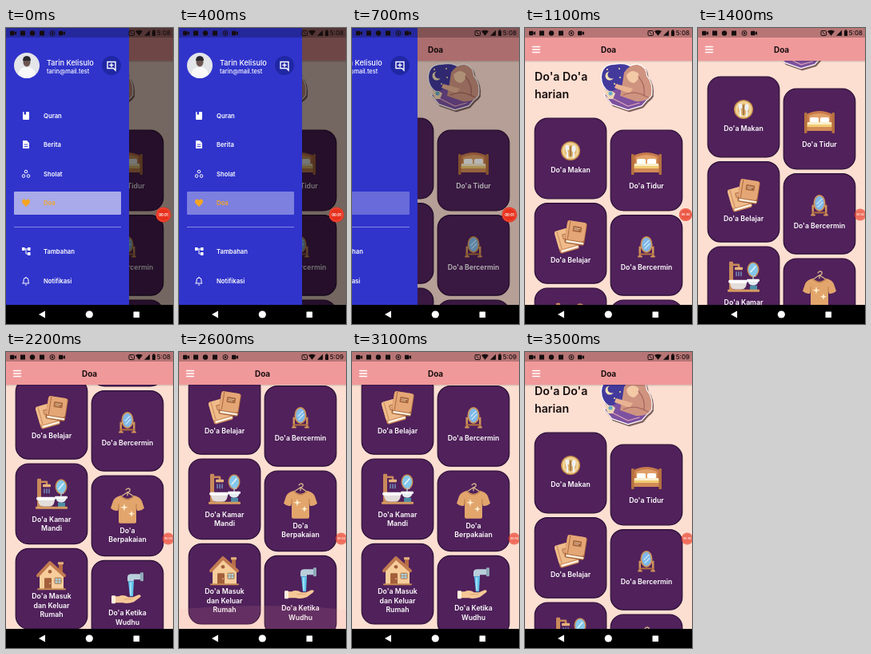
Write an HTML page that moves like this. It is 209 px wide and 371 px high and loops after 3.6 s.

```html
<!DOCTYPE html>
<html lang="id">
<head>
<meta charset="utf-8">
<title>Doa</title>
<style>
html, body { margin: 0; width: 100%; height: 100%; overflow: hidden; background: #000; }
svg { display: block; width: 209px; height: 371px; font-family: Inter, "Open Sans", sans-serif; }
</style>
</head>
<body>
<svg id="stage" viewBox="0 0 209 371"></svg>
<script>
const rect = (x, y, w, h, fill, r = 0, more = '') =>
  `<rect x="${x}" y="${y}" width="${w}" height="${h}" fill="${fill}" rx="${r}" ${more}/>`;
const disc = (x, y, r, fill, more = '') => `<circle cx="${x}" cy="${y}" r="${r}" fill="${fill}" ${more}/>`;
const oval = (x, y, rx, ry, fill, more = '') =>
  `<ellipse cx="${x}" cy="${y}" rx="${rx}" ry="${ry}" fill="${fill}" ${more}/>`;
const path = (d, fill, more = '') => `<path d="${d}" fill="${fill}" ${more}/>`;
const line = (d, color, w = 1) =>
  path(d, 'none', `stroke="${color}" stroke-width="${w}" stroke-linecap="round" stroke-linejoin="round"`);
const text = (s, x, y, size, fill, weight = 600, more = '') =>
  `<text x="${x}" y="${y}" font-size="${size}" fill="${fill}" font-weight="${weight}" ${more}>${s}</text>`;
const group = (inner, move = '', id = '') => `<g id="${id}" transform="${move}">${inner}</g>`;
const at = (x, y, inner) => `<g transform="translate(${x} ${y})">${inner}</g>`;

const middle = 'text-anchor="middle"';
const brown = '#b5703f', cream = '#f8e3c0', sky = '#84c8ec', pink = '#f0999a', ink = '#160d0e';

const book = (cover, edge) =>
  rect(-12, -15, 25, 29, edge, 3) + rect(-12, -15, 24, 24, cover, 3) +
  rect(-10, 10, 22, 2.5, '#fff3e2') + rect(-4, -9, 11, 7, edge, 1) +
  line('M-2 -6.5H5M-2 -4.5H3', cream, .7) + line('M-8.5 -14V8', edge, .9);

const icons = {
  plate: disc(0, 0, 12, '#c9924f') + disc(0, 0, 10.5, '#f0d293') + disc(0, 0, 7, '#d9a65e') +
    line('M-5 -6V-2Q-5 1 -4 2V8M-3 -6V-2M4 2V8', '#eef0f2', 2.4) + oval(4, -2.5, 2.6, 4.5, '#eef0f2') +
    line('M0 -5V7', '#6e5436', 1),
  books: group(book('#efbb8a', '#c98659'), 'translate(-5 4) rotate(-16)') +
    group(book('#e5a676', '#a8683f'), 'translate(6 -5) rotate(9)'),
  bath: rect(-18, -19, 5, 36, '#c98a5a', 1) + line('M-13 -15H-6V-11', '#c98a5a', 2.5) +
    rect(-11, -12, 10, 3.5, '#e6b27c', 1) + line('M-9 -6V-1M-6 -6V-1M-3 -6V-1', sky, 1) +
    oval(12, -9, 7.5, 9.5, '#c98a4e') + oval(12, -9, 6, 8, sky) + line('M9 -6L15 -13', '#e6f6fd', 1.5) +
    path('M-17 6H4Q4 16 -3 16H-10Q-17 16 -17 6Z', '#e3dedb') + rect(-19, 4, 24, 4, '#fff', 2) +
    path('M5 4H19Q18 11 12 11Q6 11 5 4Z', '#e4ecf0') + rect(4, 3, 16, 3, '#fff', 1) +
    rect(8, 11, 9, 6, '#4d8fa8') + line('M12 3V-1H15', '#b8c3cc', 1.5) + rect(-20, 16, 40, 3, '#d59a60', 1),
  house: rect(9, -15, 5, 13, '#b56b45') + rect(8, -16, 7, 3, '#e6b27c', .5) +
    path('M-15 1L-2 -13L15 1V18H-15Z', '#f6cd9b') + line('M-17 1L-2 -15L16 1', '#c27a50', 4) +
    rect(-9, 4, 9, 14, '#a35f3a', 1) + disc(-2, 11, .8, cream) + disc(-2, -4, 2.3, '#a35f3a') +
    rect(4, 4, 8, 7, '#a5d6e8', .5, `stroke="${brown}"`) + line('M8 4V11M4 7.5H12', brown, .7) +
    rect(-18, 17, 36, 2, '#c68a56', 1),
  bed: path('M-16 10V-10Q0 -18 16 -10V10Z', '#c87b4c') + path('M-13 0V-8Q0 -14 13 -8V0Z', '#e0a068') +
    rect(-12, -6, 11, 7, '#fff', 2) + rect(1, -6, 11, 7, '#fff', 2) +
    path('M-15 0H15L17 8H-17Z', '#fbeecb') + rect(-16, 3, 32, 3, '#f2cb74') + rect(-17, 6, 34, 5, '#d18a56', 1) +
    rect(-19, -12, 3.5, 26, brown, 1) + rect(15.5, -12, 3.5, 26, brown, 1),
  mirror: rect(-9.5, -1, 2.5, 13, '#d0945a', 1) + rect(7, -1, 2.5, 13, '#d0945a', 1) +
    oval(0, -3, 7.5, 10.5, '#d0945a') + oval(0, -3, 5.7, 8.6, '#7fb8ea') +
    line('M-3 -2L3 -8M-2 2L4 -4', '#d3ecfa', 1.2) + rect(-9, 8, 18, 2, brown) + line('M-10 12H-6M6 12H10', '#d0945a', 2),
  shirt: line('M0 -13V-17Q4 -18 3 -21Q0 -23 -2 -20M0 -17L-9 -11M0 -17L9 -11', '#d8b98c', 1.3) +
    path('M-8 -13Q-16 -11 -18 -6L-21 3Q-17 7 -12 6L-11 3V20Q-11 22 -9 22H9Q11 22 11 20V3L12 6Q17 7 21 3L18 -6Q16 -11 8 -13Q0 -5 -8 -13Z', '#e2a56c') +
    line('M-11 4V-2M11 4V-2M-8 -12Q0 -4 8 -12', '#bd7e49', 1.1) +
    path('M-4 -3L-3 1L1 2L-3 3L-4 7L-5 3L-9 2L-5 1ZM5 6L6 9L9 10L6 11L5 14L4 11L1 10L4 9Z', '#fff0d2'),
  tap: path('M0 -9V-14Q0 -18 5 -18H19V-11H8V-9Z', '#b9cfdb') + rect(16, -20, 4, 11, '#8fa9b8', 1) +
    path('M1 -9H8L7 10H3Z', '#5fc3ec') + line('M4 -7V8', '#c9effb', 1.2) +
    path('M-17 10H-11Q-5 7 1 11H7L14 8Q18 8 16 11L8 17Q0 20 -6 18H-17Z', '#f6c897') +
    rect(-20, 9, 5, 10, '#fff0df', 1) + line('M-4 13.5H6', '#d89d6a', .8)
};

// icon, icon height, first label height, label lines
const columns = [
  [['plate', 41, 65, "Do'a Makan"], ['books', 43, 72, "Do'a Belajar"],
   ['bath', 38, 70, "Do'a Kamar", 'Mandi'], ['house', 33, 60, "Do'a Masuk", 'dan Keluar', 'Rumah']],
  [['bed', 42, 70, "Do'a Tidur"], ['mirror', 40, 66, "Do'a Bercermin"],
   ['shirt', 38, 69, "Do'a", 'Berpakaian'], ['tap', 35, 66, "Do'a Ketika", 'Wudhu']]
];
const card = ([icon, iconY, labelY, ...lines]) =>
  rect(.2, .2, 89.6, 100.6, '#50215b', 16, 'stroke="#2a0f36" stroke-width="1.2"') + at(45, iconY, icons[icon]) +
  lines.map((s, i) => text(s, 45, labelY + 3 + i * 11.4, 8.7, '#fff', 600, middle)).join('');
const cards = columns.map((col, c) =>
  col.map((item, i) => at(12 + c * 95, 113 + c * 15 + i * 106.4, card(item))).join('')).join('');

const night = 'M-31 -12Q-30 -27 -15 -27Q0 -30 8 -22L4 6H-22Q-31 0 -31 -12Z';
const veil = 'M-3 -17Q4 -28 14 -27Q24 -25 25 -13Q33 -4 31 11Q26 20 12 19L-8 12L-5 -4Z';
const rug = 'M-27 11L-10 2L31 10L19 24L2 29L-18 22Z';
const outline = color => [night, veil, rug].map(d =>
  path(d, color, `stroke="${color}" stroke-width="2.5" stroke-linejoin="round"`)).join('');
const prayer = at(1.5, 2, outline('#80605c')) + outline('#fff') +
  path(night, '#433a9c') + disc(-21, -13, 5.5, '#f4e3b4') + disc(-18.5, -14.5, 5, '#433a9c') +
  [[-24, -21], [-9, -22], [-8, -11], [-15, -3]].map(p => disc(...p, 1, '#ffe8a5')).join('') +
  path(rug, '#7d519f') + line('M-22 13L2 25L16 21', '#e0a9bb', 1.3) +
  path(veil, '#cf9480') + path('M0 -14Q7 -23 15 -16Q17 -8 9 -4Q1 -5 0 -14Z', '#f4c9a6') +
  path('M4 9L-15 2L-13 -3L8 3Z', '#e9b392') + line('M15 -12Q24 -2 22 12M-4 11Q10 4 27 14', '#a8695f', 1.3) +
  path('M-27 8Q-20 3 -14 9L-17 16H-23Z', '#efd6b2') + disc(-20, 9, 2.5, '#66a9c9');

const header = text("Do'a Do'a", 12, 66, 14.2, ink, 600) + text('harian', 12, 88, 14.2, ink, 600) +
  at(127, 73, prayer);

const appBar = rect(0, 41, 209, 1.5, '#0002') + rect(0, 0, 209, 41, pink) +
  line('M9.5 23.5H18.5M9.5 27H18.5M9.5 30.5H18.5', '#fff', 1.4) + text('Doa', 95, 31, 9.9, ink, 700);

const blue = '#3034cb';
const menuIcons = [
  [110, rect(-4, -5, 8, 10, '#fff', 1) + path('M-2.5 -5H0V-1L-1.2 -2L-2.5 -1Z', blue)],
  [146, path('M-4 -5H1L4 -2V5H-4Z', '#fff') + line('M-2 0H2M-2 2.5H2', blue, .9)],
  [183, [[0, -3], [-3, 2.5], [3, 2.5]].map(p => disc(...p, 1.8, 'none', 'stroke="#fff"')).join('')],
  [219, path('M0 5L-4.5 .5Q-6 -4 -2.5 -4.5Q-1 -4.5 0 -3Q1 -4.5 2.5 -4.5Q6 -4 4.5 .5Z', '#f5a524')],
  [280, line('M-2 -3H2M0 -3V3H2', '#fff') + rect(-5, -5, 3.5, 4, '#fff') + rect(2, -5, 3.5, 4, '#fff') +
    rect(2, 1, 3.5, 4, '#fff')],
  [317, line('M-4 3H4L3 1.5V-1Q3 -4 0 -4Q-3 -4 -3 -1V1.5ZM-.7 5H.7M0 -4.8V-4', '#fff')]
];
const labels = ['Quran', 'Berita', 'Sholat', 'Doa', 'Tambahan', 'Notifikasi'];
const drawer = rect(0, 0, 154, 347, blue) +
  disc(26, 47, 16, '#e3e5e8') +
  path('M15 58.5Q16 49 26 49Q36 49 37 58.5Q26 67.5 15 58.5Z', '#f9f9fa') +
  oval(26, 42.5, 4.5, 6, '#6b5550') + path('M21 41Q21 35 26 35Q31 35 31 41Z', '#29282e') +
  text('Tarin Kelisulo', 51, 47, 9.2, '#fff', 500) + text('tarin@mail.test', 51, 57, 7.4, '#fff', 500) +
  disc(132, 47, 12, '#2027a4') +
  path('M127 42.5H137V53L134.5 50.5H127Z', 'none', 'stroke="#fff" stroke-width="1.4"') +
  line('M132 44.3V48.7M129.8 46.5H134.2', '#fff', 1.3) +
  rect(10, 205, 134, 29, '#fff', 1, 'id="press"') + rect(10, 249, 134, 1, '#8588e4') +
  menuIcons.map(([y, icon], i) =>
    at(25, y, icon) + text(labels[i], 47, y + 2.8, 7.7, i == 3 ? '#f5a524' : '#fff')).join('');

const camera = rect(-4, -2.8, 5.5, 5.6, ink, 1) + path('M1.5 -.5L4 -2.5V2.5L1.5 .5Z', ink);
const statusBar = rect(0, 0, 209, 12, '#0000003d') + at(9, 6.5, camera) + rect(18, 3.5, 6, 6, ink) +
  disc(33, 6.5, 3.2, ink) + rect(42, 3.5, 6, 6, ink) + disc(58, 6.5, 3, 'none', `stroke="${ink}"`) +
  disc(58, 6.5, 1.2, ink) + at(70, 6.5, camera) +
  rect(154, 3.5, 6.5, 6, 'none', 1, `stroke="${ink}"`) + line('M156 5L158.5 8', ink) +
  path('M162 4Q166.5 1.5 171 4L166.5 9.8Z', ink) + path('M173 9.8H180V2.8Z', ink) +
  rect(183, 3.3, 4, 6.7, ink, .7) + rect(184, 2.3, 2, 1, ink) +
  text('', 206, 9.4, 7.9, ink, 500, 'id="clock" text-anchor="end"');

const navBar = rect(0, 347, 209, 24, '#000') + path('M41 359L49 354.5V363.5Z', '#fff') +
  disc(104.3, 359, 4.6, '#fff') + rect(159.5, 355.5, 7.5, 7.5, '#fff', .5);

const recorder = disc(0, 0, 9.5, '#e8301c') + disc(0, 0, 8, 'none', 'stroke="#f4695a" stroke-width=".6"') +
  text('', 0, 1.5, 4.2, '#fff', 700, `id="timer" ${middle}`);

const $ = id => document.getElementById(id);
$('stage').innerHTML = rect(0, 0, 209, 371, '#fddfd2') + group(header + cards, '', 'page') +
  oval(104, 346, 190, 28, pink, 'id="glow"') + appBar +
  rect(0, 0, 209, 347, '#000', 0, 'id="scrim"') + group(drawer, '', 'drawer') +
  statusBar + navBar + group(recorder, '', 'rec');

// piecewise linear track of [time, value] points
function track(points, t) {
  const i = points.findIndex(p => p[0] > t);
  if (i == 0) return points[0][1];
  if (i < 0) return points[points.length - 1][1];
  const [a, v] = points[i - 1], [b, w] = points[i];
  return v + (w - v) * (t - a) / (b - a);
}
const scrolling = [[1150, 0], [1300, 28], [1400, 52], [1600, 96], [1800, 130], [2000, 164], [2200, 186],
  [2400, 192], [3100, 192], [3200, 174], [3300, 105], [3400, 45], [3500, 12]];

function draw(t) {
  const u = Math.min(1, Math.max(0, (t - 500) / 418));
  const shut = u * u * (3 - 2 * u);
  const idle = track([[900, 0], [1200, 1]], t);
  $('page').setAttribute('transform', `translate(0 ${-track(scrolling, t)})`);
  $('drawer').setAttribute('transform', `translate(${-154 * shut} 0)`);
  $('scrim').setAttribute('opacity', .54 * (1 - shut));
  $('press').setAttribute('opacity', track([[0, .58], [600, .27]], t));
  $('glow').setAttribute('opacity', track([[2200, 0], [2500, .12], [2650, .12], [2900, 0]], t));
  $('rec').setAttribute('transform', `translate(${197 + 6 * idle} 234) scale(${1 - .22 * idle})`);
  $('rec').setAttribute('opacity', 1 - .35 * idle);
  $('timer').textContent = '00:0' + (t < 1000 ? 1 : t < 1800 ? 2 : t < 2500 ? 3 : t < 3400 ? 4 : 5);
  $('clock').textContent = t < 2300 ? '5:08' : '5:09';
}

const start = performance.now();
function tick() {
  draw(Math.floor((performance.now() - start) % 3600 / 100) * 100);
  requestAnimationFrame(tick);
}
tick();
</script>
</body>
</html>
```
